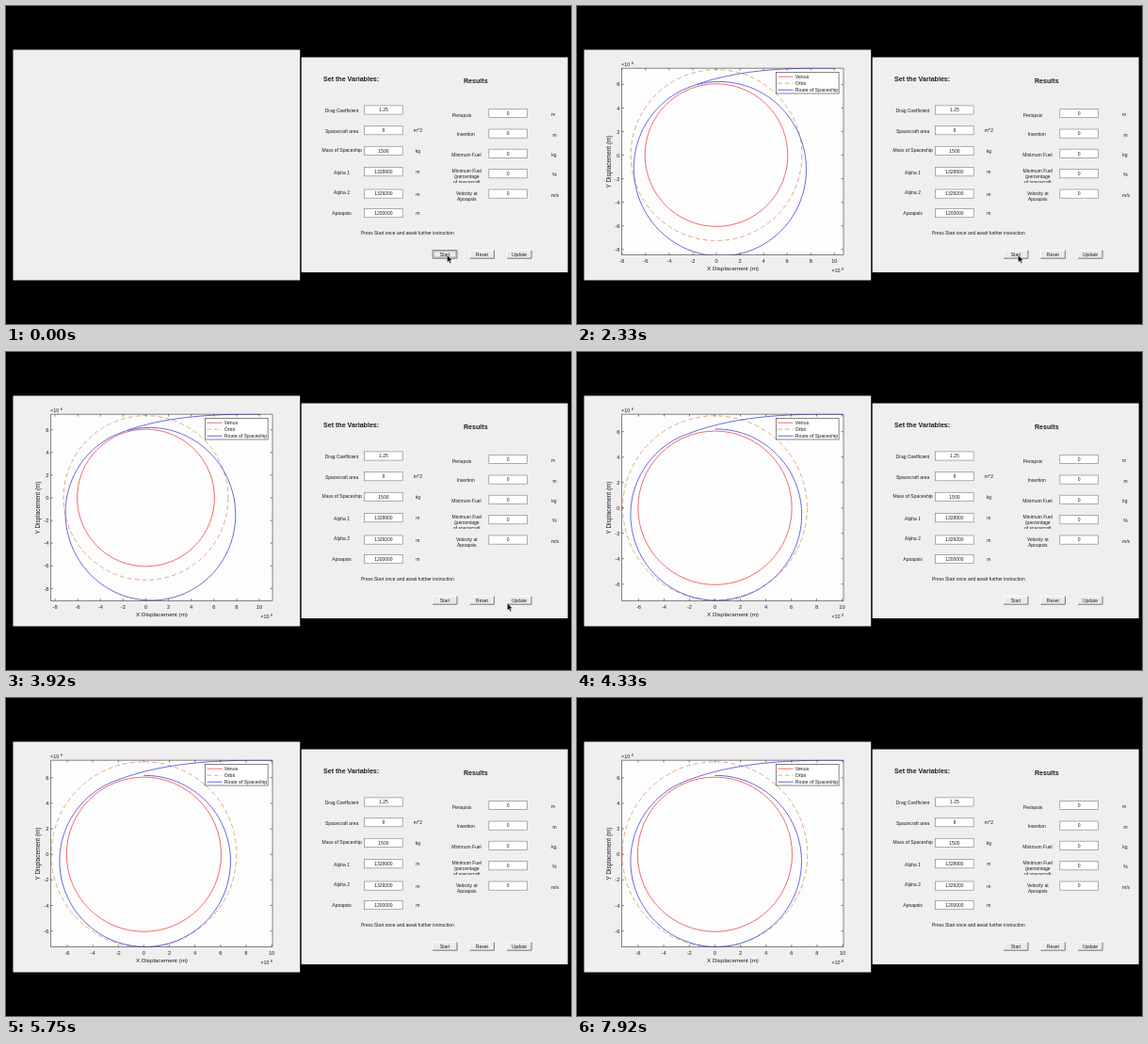
An HTML page for the animation above (8 s loop, 600 by 338 pixels).

```html
<!DOCTYPE html>
<html lang="en">
<head>
<meta charset="utf-8">
<title>Aerobraking orbit plot</title>
<style>
html, body { margin: 0; width: 100%; height: 100%; overflow: hidden; background: #000; }
svg { display: block; width: 600px; height: 338px; font-family: "Liberation Sans", Arial, sans-serif; }
</style>
</head>
<body>
<svg id="stage" viewBox="0 0 600 338" width="600" height="338">
  <defs>
    <clipPath id="axesClip"><rect x="47.2" y="65.8" width="236.1" height="199"/></clipPath>
    <clipPath id="noteClip"><rect x="465" y="170" width="48" height="17.9"/></clipPath>
  </defs>
  <rect width="600" height="338"/>
  <rect x="7.5" y="46.5" width="304.7" height="245" fill="#f0eff0"/>
  <rect x="313.7" y="54.5" width="282.9" height="228.6" fill="#f0eff0"/>
  <g id="plot"></g>
  <g id="panel"></g>
  <path id="cursor" d="M0 0V7.2L1.7 5.7 2.9 8.4 4.1 7.9 2.9 5.2H5.2Z" fill="#000" stroke="#fff" stroke-width=".3"/>
</svg>
<script>
const LOOP = 8000;
const BOX = { l: 47.5, r: 283, t: 66.2, b: 264.5 };
const PLANET = 6.05, ORBIT = 7.25;
const ENTRY = { x: 10.05, y: 7.37 };
const BRAKE = 111;
const RED = '#ee5c5c', TAN = '#dba27c', BLUE = '#5454dc', INK = '#333';

// ox, k: axis origin and px per 1e6 m; peri, rp, ra: captured ellipse; end: last polar angle
const passes = [
  { at: 1250, ox: 158, k: 8.71, step: 5, peri: 111, rp: 6.27, ra: 15.88, end: 303.8 },
  { at: 2250, ox: 148, k: 12.53, step: 2, peri: 105, rp: 6.2, ra: 8.6, end: 465 },
  { at: 3250, ox: 148.5, k: 12.05, step: 2, peri: 106, rp: 6.15, ra: 9.11, end: 465 },
  { at: 4250, ox: 146.5, k: 13.5, step: 2, peri: 100, rp: 6.2, ra: 7.3, end: 450 },
  { at: 5330, ox: 146.4, k: 13.57, step: 2, peri: 100, rp: 6.17, ra: 7.25, end: 450 }
];

// time, x, y of the pointer tip
const moves = [
  [0, 468.6, 265], [3250, 490, 265], [3330, 513, 264.3], [3420, 521, 265],
  [3500, 527, 266], [3580, 531, 267], [3670, 532.5, 267.3], [4250, 580, 264], [4330, -20, 0]
];

const $ = id => document.getElementById(id);
const rad = deg => deg * Math.PI / 180;
const n2 = v => v.toFixed(2);

function text(s, x, y, size, anchor = 'middle', extra = '') {
  return `<text x="${n2(x)}" y="${n2(y)}" font-size="${size}" text-anchor="${anchor}" fill="#1c1c1c" ${extra}>${s}</text>`;
}

function line(d, color, width, extra = '') {
  return `<path d="${d}" fill="none" stroke="${color}" stroke-width="${width}" ${extra}/>`;
}

function routePath(p, oy) {
  const e = (p.ra - p.rp) / (p.ra + p.rp);
  const ellipse = a => p.rp * (1 + e) / (1 + e * Math.cos(rad(a - p.peri)));
  // incoming hyperbola: meets the ellipse at the braking angle and passes through ENTRY
  const h = ellipse(BRAKE);
  const R = Math.hypot(ENTRY.x, ENTRY.y);
  const start = Math.atan2(ENTRY.y, ENTRY.x) * 180 / Math.PI;
  const eh = (R - h) / (h - R * Math.cos(rad(start - BRAKE)));
  const inbound = a => h * (1 + eh) / (1 + eh * Math.cos(rad(a - BRAKE)));
  const pts = [];
  const add = (a, r) => pts.push(n2(p.ox + p.k * r * Math.cos(rad(a))) + ' ' + n2(oy - p.k * r * Math.sin(rad(a))));
  for (let i = 0; i <= 60; i++) {
    const a = start + (BRAKE - start) * i / 60;
    add(a, inbound(a));
  }
  for (let i = 1; i <= 180; i++) {
    const a = BRAKE + (p.end - BRAKE) * i / 180;
    add(a, ellipse(a));
  }
  return 'M' + pts.join('L');
}

function power(x, y, exp) {
  return text('×10', x, y, 5.4, 'start') + text(exp, x + 10.8, y - 2.6, 4.2, 'start');
}

function legend() {
  const rows = [['Venus', RED, ''], ['Orbit', TAN, 'stroke-dasharray="4.6 2.8"'], ['Route of Spaceship', BLUE, '']];
  return '<rect x="211.3" y="70.6" width="66.8" height="22.4" fill="#fff" stroke="#333" stroke-width=".6"/>' +
    rows.map(([s, c, dash], i) => {
      const y = 75.2 + i * 7;
      return line(`M213.5 ${y}H229.5`, c, .9, dash) + text(s, 231.8, y + 1.9, 5.2, 'start');
    }).join('');
}

function drawPlot(p) {
  const { l, r, t, b } = BOX;
  const oy = t + ENTRY.y * p.k;
  const wide = p.step === 5;
  let ticks = '', labels = '';
  for (let v = Math.ceil((l - p.ox) / p.k / p.step) * p.step; p.ox + v * p.k <= r + .3; v += p.step) {
    const x = n2(p.ox + v * p.k);
    ticks += `M${x} ${b}v-2.4M${x} ${t}v2.4`;
    labels += text(wide ? v / 10 : v, +x, 272.6, 5.7);
  }
  for (let v = 6; oy - v * p.k <= b; v -= 2) {
    const y = n2(oy - v * p.k);
    ticks += `M${l} ${y}h2.4M${r} ${y}h-2.4`;
    labels += text(v, 45.3, +y + 2.1, 5.7, 'end');
  }
  const ring = (rad, color, dash) =>
    `<circle cx="${p.ox}" cy="${n2(oy)}" r="${n2(rad * p.k)}" fill="none" stroke="${color}" stroke-width=".9" ${dash}/>`;
  const yx = wide ? 33.2 : 36.2;
  return `<rect x="${l}" y="${t}" width="${r - l}" height="${b - t}" fill="#fefdfe"/>` +
    '<g clip-path="url(#axesClip)">' +
    ring(PLANET, RED, '') + ring(ORBIT, TAN, 'stroke-dasharray="5 3"') +
    line(routePath(p, oy), BLUE, .9) + '</g>' +
    line(`M${l} ${t}H${r}V${b}H${l}Z${ticks}`, INK, .6) + labels +
    text('X Displacement (m)', 165.5, 281.2, 6.25) +
    text('Y Displacement (m)', 0, 0, 6.4, 'middle', `transform="translate(${yx} 165.5) rotate(-90)"`) +
    power(47, 64.2, 6) + power(270.3, 283.4, wide ? 7 : 6) + legend();
}

function field(x, y, value) {
  return `<rect x="${x}" y="${y - 4.6}" width="40.6" height="9.2" fill="#fff" stroke="#8c8c8c" stroke-width=".7"/>` +
    text(value, x + 20.3, y + 1.7, 5);
}

function button(s, x, pressed) {
  const y = 259.6, w = 26, h = 8.6;
  return `<rect x="${x}" y="${y}" width="${w}" height="${h}" fill="#ecebec"/>` +
    line(`M${x} ${y + h}V${y}H${x + w}`, pressed ? '#666' : '#fff', .8) +
    line(`M${x} ${y + h}H${x + w}V${y}`, '#686868', .9) +
    (pressed ? line(`M${x + 1.2} ${y + 1.2}h${w - 2.4}v${h - 2.4}h${2.4 - w}z`, '#888', .6) : '') +
    text(s, x + w / 2, y + 6, 5);
}

function drawPanel(pressed) {
  const inputs = [
    ['Drag Coefficient', 111, '1.25', 110.5, ''],
    ['Spacecraft area', 133.6, 9, 132.2, 'm^2'],
    ['Mass of Spaceship', 153.7, 1500, 153.9, 'kg'],
    ['Alpha 1', 177.4, 1328900, 176.2, 'm'],
    ['Alpha 2', 198.6, 1329200, 199.6, 'm'],
    ['Apoapsis', 220.6, 1200000, 220.1, 'm']
  ];
  const results = [
    ['Periapsis', 484, 116.4, 114, 'm', 581],
    ['Insertion', 488.3, 136.4, 135.6, 'm', 582.7],
    ['Minimum Fuel', 489, 158, 156.8, 'kg', 582],
    ['', 0, 0, 178.2, '%', 582.4],
    ['Velocity at', 489.3, 199.2, 199.6, 'm/s', 583]
  ];
  return text('Set the Variables:', 337, 80.2, 7.1, 'start', 'font-weight="bold"') +
    text('Results', 498.8, 81.5, 7.1, 'middle', 'font-weight="bold"') +
    inputs.map(([s, ly, v, y, unit]) =>
      text(s, 356.6, ly + 1.7, 5) + field(380.6, y, v) + text(unit, 437.3, y + 2, 5)).join('') +
    results.map(([s, x, ly, y, unit, ux]) =>
      text(s, x, ly + 1.7, 5) + field(512.8, y, 0) + text(unit, ux, y + 2.9, 5)).join('') +
    '<g clip-path="url(#noteClip)">' +
    ['Minimum Fuel', '(percentage', 'of spacecraft'].map((s, i) => text(s, 489.3, 176.9 + i * 5.9, 5)).join('') + '</g>' +
    text('Apoapsis', 489.3, 206.5, 5) +
    text('Press Start once and await further instruction', 426.4, 243.2, 4.97) +
    button('Start', 453, pressed) + button('Reset', 492.4) + button('Update', 532);
}

let shownPass, shownPress;

function render(t) {
  const pass = passes.filter(p => t >= p.at).pop() || null;
  if (pass !== shownPass) {
    $('plot').innerHTML = pass ? drawPlot(pass) : '';
    shownPass = pass;
  }
  const pressed = t < 170;
  if (pressed !== shownPress) {
    $('panel').innerHTML = drawPanel(pressed);
    shownPress = pressed;
  }
  const [, x, y] = moves.filter(m => t >= m[0]).pop();
  $('cursor').setAttribute('transform', `translate(${x} ${y})`);
}

const t0 = performance.now();
function frame() {
  render((performance.now() - t0) % LOOP);
  requestAnimationFrame(frame);
}
render(0);
requestAnimationFrame(frame);
</script>
</body>
</html>
```
